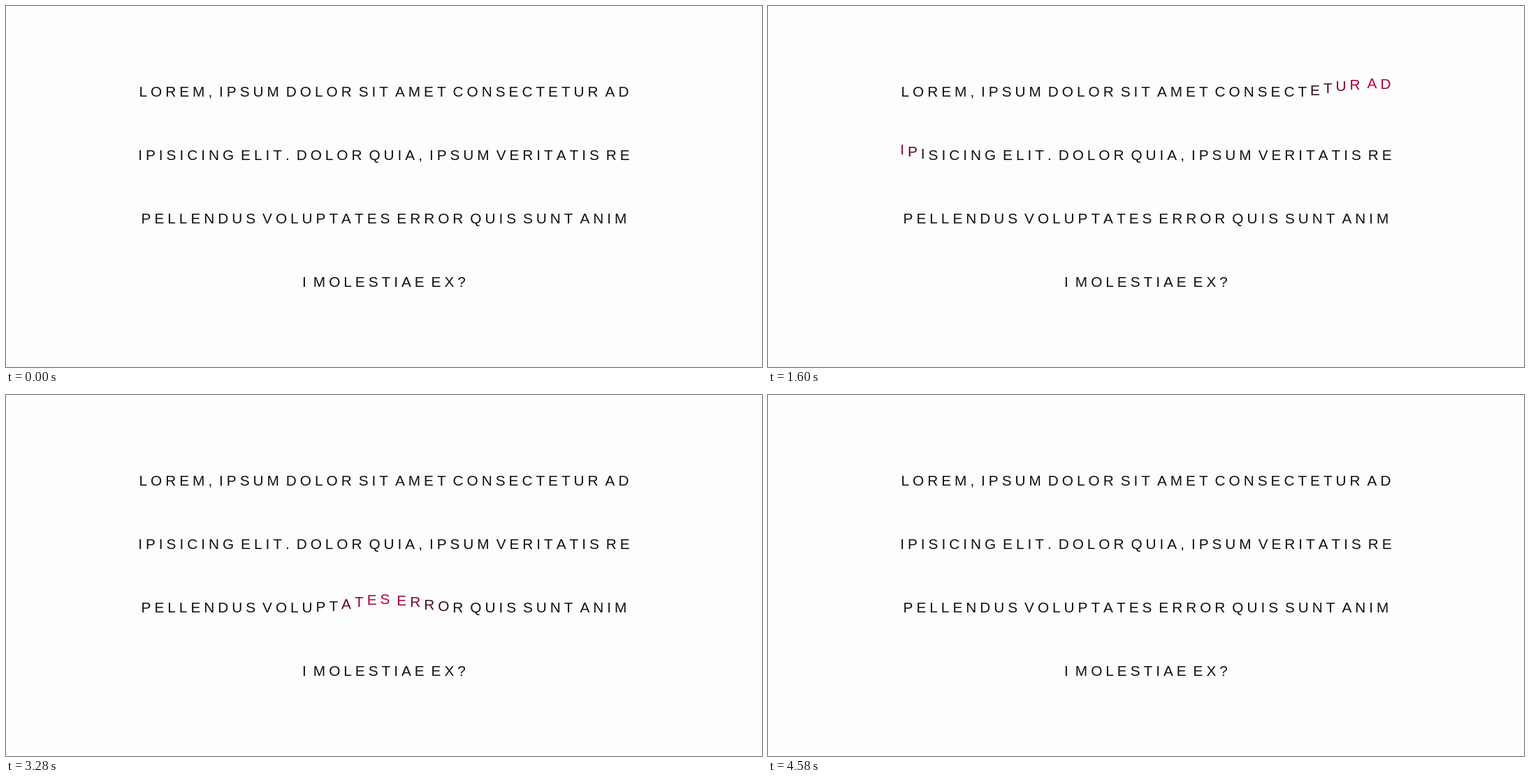
Recreate the animation shown at these times as an HTML page. Size 1082 px wide and 518 px high, loop 4610 ms.

```html
<!DOCTYPE html>
<html lang="la">
<head>
<meta charset="utf-8">
<title>Letter wave</title>
<style>
html, body { margin: 0; width: 100%; height: 100%; overflow: hidden; background: #fdfdfd; }
#text {
  position: absolute; left: 0; top: 77px; width: 1082px;
  font: 20.8px/91px "Liberation Sans", Arial, sans-serif;
  color: #111; text-align: center; white-space: nowrap;
}
#text div { height: 91px; }
#text span { display: inline-block; margin: 0 .12em; }
</style>
</head>
<body>
<div id="text"></div>
<script>
const LINES = [
  "LOREM, IPSUM DOLOR SIT AMET CONSECTETUR AD",
  "IPISICING ELIT. DOLOR QUIA, IPSUM VERITATIS RE",
  "PELLENDUS VOLUPTATES ERROR QUIS SUNT ANIM",
  "I MOLESTIAE EX?"
];
const LOOP = 4610;
const FIRST_PEAK = 619;   // ms at which the first letter is highest
const STAGGER = 24.8;     // ms between neighbouring letters
const HALF = 153;         // ms from rest to peak
const LIFT = 12.4;
const REST = [17, 17, 17], PEAK = [188, 0, 60];

const letters = [];
const root = document.getElementById("text");
for (const line of LINES) {
  const row = root.appendChild(document.createElement("div"));
  for (const ch of line) {
    const el = row.appendChild(document.createElement("span"));
    el.textContent = ch.trim();
    letters.push(el);
  }
}

// Smooth bump: 1 at the peak, 0 at HALF and beyond
function bump(ms) {
  const d = Math.abs(ms) / HALF;
  return d < 1 ? (1 + Math.cos(Math.PI * d)) / 2 : 0;
}

function mix(k) {
  return `rgb(${REST.map((c, i) => Math.round(c + (PEAK[i] - c) * k))})`;
}

function draw(t) {
  letters.forEach((el, i) => {
    const k = bump(t - FIRST_PEAK - i * STAGGER);
    el.style.transform = k ? `translateY(${(-LIFT * k).toFixed(2)}px)` : "none";
    el.style.color = k ? mix(k) : "";
  });
}

const start = performance.now();
function tick() {
  draw((performance.now() - start) % LOOP);
  requestAnimationFrame(tick);
}
tick();
</script>
</body>
</html>
```
